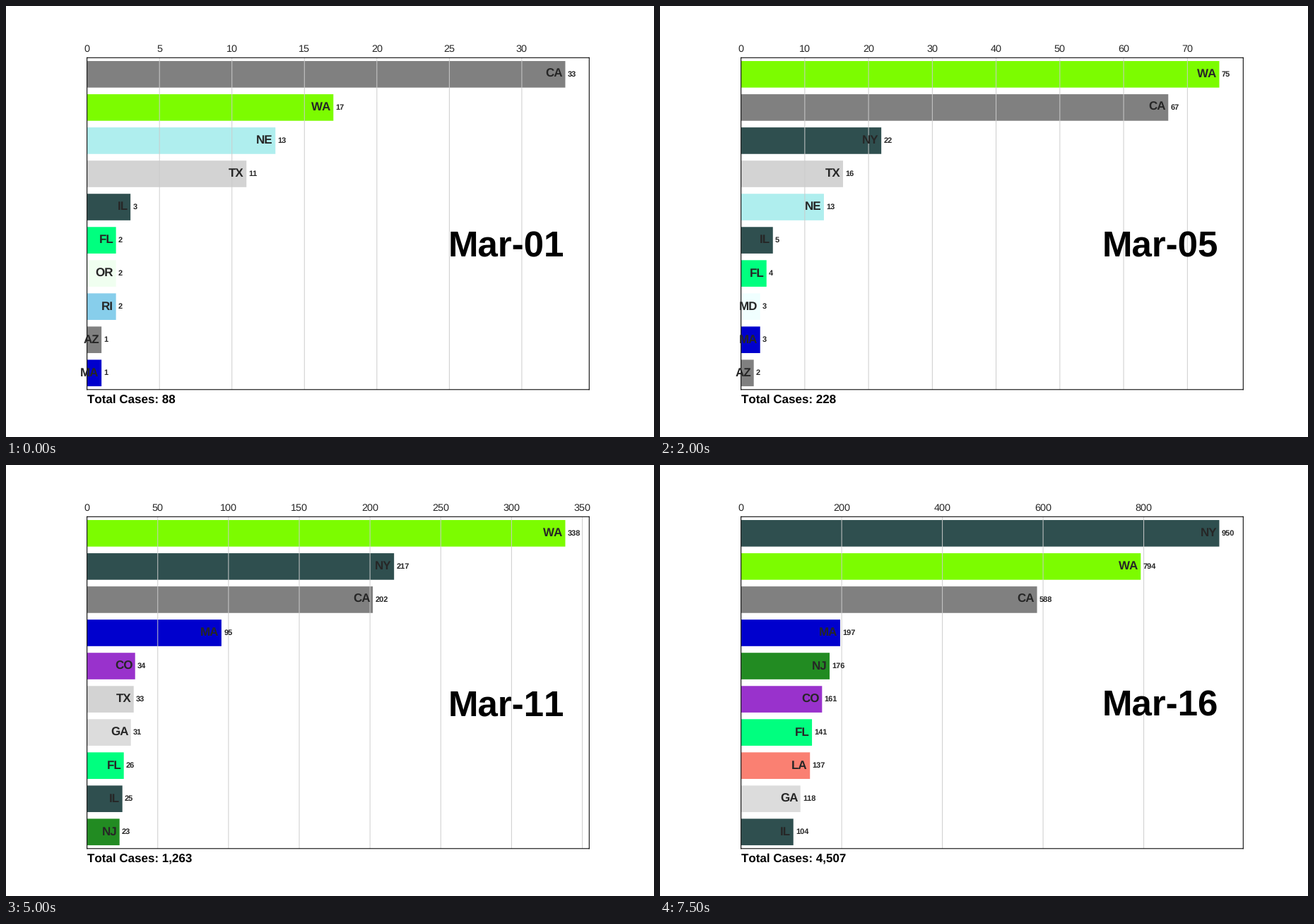
A matplotlib script that plays this animation: 917x611 px, repeating every 8 s.

```python
import numpy as np
import matplotlib.pyplot as plt
from matplotlib.animation import FuncAnimation

W, H, DPI = 917, 611, 64
DAYS, ROWS = 16, 10
INK = "0.15"


def pt(size):
    """Point size on a 15 inch wide page, fitted to the stage width."""
    return size * W / 1080 * 72 / DPI


plt.rcParams.update({
    "font.family": "Liberation Sans",
    "text.hinting": "none",
    "text.kerning_factor": 6,
    "text.color": INK,
    "path.snap": False,
    "axes.edgecolor": "black",
    "axes.linewidth": pt(1.25),
})

# Cumulative cases are set on a few days and grow quadratically in between.
KEY_DAYS = (1, 3, 5, 9, 11, 14, 16)
TOTAL = (88, 125, 228, 748, 1263, 2898, 4507)

# Sorted by full state name, which settles ties.
STATES = {
    "AZ": ("gray", 1, 2, 2),
    "CA": ("gray", 33, 45, 67, 172, 202, 381, 588),
    "CO": ("darkorchid", 0, 0, 2, 12, 34, 103, 161),
    "FL": ("springgreen", 2, 3, 4, 14, 26, 70, 141),
    "GA": ("gainsboro", 0, 2, 2, 17, 31, 64, 118),
    "IL": ("darkslategray", 3, 4, 5, 11, 25, 66, 104),
    "LA": ("salmon", 0, 0, 0, 1, 14, 77, 137),
    "MD": ("azure", 0, 0, 3),
    "MA": ("mediumblue", 1, 2, 3, 41, 95, 138, 197),
    "NE": ("paleturquoise", 13, 13, 13, 16, 18),
    "NH": ("rosybrown", 0, 2),
    "NJ": ("forestgreen", 0, 0, 2, 11, 23, 75, 176),
    "NY": ("darkslategray", 0, 2, 22, 142, 217, 610, 950),
    "OR": ("honeydew", 2, 2, 2, 13, 19),
    "RI": ("skyblue", 2, 2),
    "TX": ("lightgray", 11, 11, 16, 24, 33, 69, 96),
    "WA": ("lawngreen", 17, 32, 75, 179, 338, 609, 794),
}


def cases_on(day, keys):
    root = np.interp(day, KEY_DAYS[:len(keys)], np.sqrt(keys), right=0)
    return round(root ** 2)


def top_states(day):
    found = [(name, color, cases_on(day, keys))
             for name, (color, *keys) in STATES.items()]
    return sorted(found, key=lambda item: -item[2])[:ROWS]


fig = plt.figure(figsize=(W / DPI, H / DPI), dpi=DPI, facecolor="white")
ax = fig.add_axes([0.125, 0.11, 0.775, 0.77])


def draw(i):
    day = i + 1
    ax.clear()
    ranking = top_states(day)
    peak = ranking[0][2]
    gap = peak / 200

    for row, (name, color, cases) in enumerate(ranking):
        ax.barh(row, cases, height=0.8, color=color, linewidth=0)
        ax.text(cases - gap, row, name, size=pt(20), weight="bold",
                ha="right", va="center")
        ax.text(cases + gap, row, f"{cases:,}", size=pt(13), weight="bold",
                ha="left", va="center")

    ax.text(0.95, 0.4, f"Mar-{day:02d}", transform=ax.transAxes,
            size=pt(60), weight="bold", color="black", ha="right")
    ax.text(0, -0.04, f"Total Cases: {cases_on(day, TOTAL):,}",
            transform=ax.transAxes, size=pt(20), weight="bold", color="black")

    ax.set_xlim(0, peak * 1.05)
    ax.set_ylim(ROWS - 0.5, -0.5)
    ax.set_yticks([])
    ax.xaxis.tick_top()
    ax.tick_params(axis="x", length=0, pad=pt(6), labelsize=pt(17),
                   labelcolor=INK)
    ax.set_axisbelow("line")
    ax.grid(axis="x", color="0.8", linestyle="-", linewidth=pt(1.15))
    return []


anim = FuncAnimation(fig, draw, frames=DAYS, init_func=lambda: draw(0),
                     interval=500, repeat=True, repeat_delay=0)
plt.show()
```
